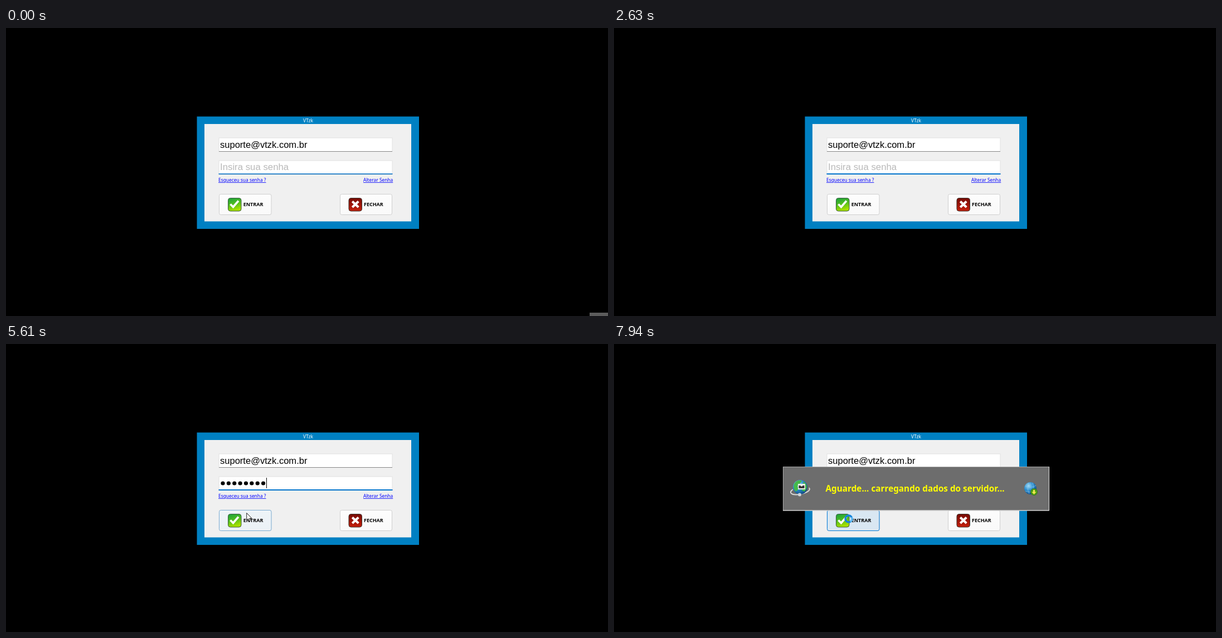
An HTML page that plays this animation: 1080 px wide and 519 px high, repeating every 8000 ms.

```html
<!DOCTYPE html>
<html lang="pt-BR">
<head>
<meta charset="utf-8">
<title>Login</title>
<style>
html, body { margin: 0; width: 100%; height: 100%; overflow: hidden; background: #000; }
svg { display: block; width: 100%; height: 100%; font: 8.4px "Noto Sans", sans-serif; }
.input { font: 16.55px "Liberation Sans", Arial, sans-serif; }
.link { fill: #00f; text-decoration: underline; }
.bold { font-weight: bold; font-size: 9px; }
.key { fill: url(#face); stroke: #cfcfcf; }
.box { fill: #fff; stroke: #e2e2e2; }
</style>
</head>
<body>
<svg viewBox="0 0 1080 519">
  <defs>
    <linearGradient id="face" x2="0" y2="1"><stop stop-color="#fdfdfd"/><stop offset="1" stop-color="#f9f9f9"/></linearGradient>
    <linearGradient id="green" x2=".3" y2="1"><stop stop-color="#18a03c"/><stop offset=".5" stop-color="#4dbb22"/><stop offset="1" stop-color="#a6e000"/></linearGradient>
    <linearGradient id="red" x2="0" y2="1"><stop stop-color="#750b04"/><stop offset="1" stop-color="#c51f0c"/></linearGradient>
    <radialGradient id="globe" cx=".35" cy=".3" r=".75"><stop stop-color="#a4dcf6"/><stop offset=".5" stop-color="#2f8fcf"/><stop offset="1" stop-color="#0d4580"/></radialGradient>
  </defs>
  <rect width="1080" height="519"/>
  <rect id="corner" x="1047" y="513" width="33" height="6" fill="#5c5c5c"/>

  <rect x="342.5" y="159.5" width="398.5" height="202.5" fill="#0080c2"/>
  <rect x="356" y="173" width="371" height="175.5" fill="#f0f0f0"/>
  <text x="542" y="170" text-anchor="middle" fill="#fff">VTzk</text>

  <rect class="box" x="382" y="198" width="311" height="24.5"/>
  <rect x="382" y="222" width="311" height="1" fill="#868686"/>
  <text class="input" x="384" y="215.5">suporte@vtzk.com.br</text>

  <rect class="box" x="382" y="239" width="311" height="24.5"/>
  <rect x="382" y="263" width="311" height="1" fill="#868686"/>
  <rect id="focus" x="381.5" y="262" width="312" height="2" fill="#0073cc"/>
  <text id="hint" class="input" x="384" y="256" style="font-size:16.8px" fill="#b9b9b9">Insira sua senha</text>
  <g id="dots"></g>
  <rect id="caret" y="241" width="1" height="19"/>

  <text class="link" x="381" y="277">Esqueceu sua senha ?</text>
  <text class="link" x="641" y="277">Alterar Senha</text>

  <rect class="key" x="382.5" y="299.5" width="93.5" height="37" rx="3"/>
  <rect id="hover" x="382.5" y="299.5" width="93.5" height="37" rx="3" fill="#d9e7f2" stroke="#0078d4"/>
  <g id="pressed">
    <rect x="382" y="299" width="94.5" height="38" fill="#f1f1f1"/>
    <rect x="384.5" y="301.5" width="90" height="33" fill="none" stroke="#222" stroke-dasharray="1"/>
  </g>
  <g id="enter">
    <rect x="398.5" y="306.5" width="23.5" height="23.5" rx="4" fill="url(#green)" stroke="#3d5a45"/>
    <path d="M402.5 317.5L407.5 322.5L417 311.5" fill="none" stroke="#fff" stroke-width="3.6"/>
    <text class="bold" x="425.7" y="321">ENTRAR</text>
  </g>

  <rect class="key" x="599.5" y="299.5" width="93" height="37" rx="3"/>
  <rect x="615" y="306.5" width="23.5" height="23.5" rx="4" fill="url(#red)" stroke="#3c3430"/>
  <path d="M621.3 312.5L632.3 323M632.3 312.5L621.3 323" stroke="#fff" stroke-width="4.2"/>
  <text class="bold" x="642" y="321">FECHAR</text>

  <g id="splash">
    <rect x="303.5" y="221.5" width="477" height="78.5" fill="#6d6d6d" stroke="#a8a8a8"/>
    <path d="M303 300H780.5V221" fill="none" stroke="#e6e6e6"/>
    <text x="379.5" y="266" fill="#ff0" style="font-weight:bold;font-size:15.3px">Aguarde... carregando dados do servidor...</text>

    <path d="M321 262C312 268 319 273 331 271C345 269 354 264 350 259" fill="none" stroke="#d9d9d9" stroke-width="2"/>
    <circle cx="334" cy="258" r="13" fill="url(#globe)"/>
    <path d="M323 253C326 246 333 244 337 247L333 252L329 256L331 262L326 266Q321 260 323 253ZM340 248Q346 252 346 259L342 266L337 264Z" fill="#45b94b"/>
    <rect x="330" y="252" width="13" height="10" fill="#e9efe9"/>
    <path d="M331.5 260V255H334L336.5 257L339 255H341.5V260Z" fill="#333"/>
    <circle cx="333" cy="271.5" r="3" fill="#cfd3d6"/>

    <circle cx="747" cy="260" r="11" fill="url(#globe)"/>
    <path d="M738 256Q747 261 757 255M738 265Q747 269 756 264M744 250Q740 260 745 270M751 250Q755 260 750 270" fill="none" stroke="#8cc9ec" opacity=".65"/>
    <circle cx="753.5" cy="266.5" r="6" fill="#4f9d17" stroke="#2d6b0d" stroke-width=".7"/>
    <path d="M752 263H755V266.5H757.5L753.5 271L749.5 266.5H752Z" fill="#f1e94d"/>
  </g>

  <path id="arrow" d="M0 0V13L3 10.3L5 14.8L7 14L5 9.6H9.2Z" fill="#fff" stroke="#000" stroke-width=".9"/>
  <path id="beam" d="M-3-6H-.8M.8-6H3M0-5.7V5.7M-3 6H-.8M.8 6H3" stroke="#000" stroke-width="1.1"/>
  <g id="busy" fill="none" stroke-width="3.4">
    <circle cx="421" cy="315" r="6" stroke="#1583d8"/>
    <path id="glow" d="M421 309A6 6 0 0 1 427 315" stroke="#69c0f5"/>
  </g>
</svg>
<script>
const $ = id => document.getElementById(id);
const LOOP = 8000, STEP = 68, PITCH = 10.37;
const keyTimes = [2770, 2910, 3530, 3600, 3860, 3930, 4330, 4460];
const caretSpans = [[2100, 2630], [2770, 4990], [5520, 6090]];

$('dots').innerHTML = keyTimes.map((_, i) =>
  `<circle cx="${389 + PITCH * i}" cy="251" r="3.6"/>`).join('');

const show = (id, on) => $(id).setAttribute('visibility', on ? 'visible' : 'hidden');
const clamp = v => Math.max(0, Math.min(1, v));
const mix = (a, b, p) => a + (b - a) * p;
// Progress in n screen updates, the first one at the start time
const ramp = (t, start, n) => clamp((Math.floor((t - start) / STEP) + 1) / n);

function pointer(t) {
  if (t >= 800 && t < 870) return { kind: 'arrow', x: 580, y: 308 };
  if (t >= 870 && t < 2630) {
    const p = ramp(t, 1410, 7);
    return { kind: 'beam', x: mix(550.5, 484.5, p) - 4 * ramp(t, 1890, 3), y: mix(260.5, 255, p) };
  }
  if (t >= 5180 && t < 6770) {
    const p = ramp(t, 5180, 12), e = p * (2 - p), y = mix(255, 315, e);
    return { kind: y < 264 ? 'beam' : 'arrow', x: mix(480.5, 421.5, e), y };
  }
  return {};
}

function focusLevel(t) {
  if (t < 2090) return 0.75 * (1 - ramp(t, 70, 6));
  if (t < 2630) return 0.75 * ramp(t, 2090, 2);
  return t < 6160 ? 1 : 0.75;
}

function draw(t) {
  const typed = keyTimes.filter(k => t >= k).length;
  const loading = t >= 6770, down = t >= 6160 && !loading;
  const at = pointer(t);

  show('corner', t < 70);
  show('hint', !typed);
  [...$('dots').children].forEach((dot, i) => dot.setAttribute('visibility', i < typed ? 'visible' : 'hidden'));
  show('caret', caretSpans.some(([a, b]) => t >= a && t < b));
  $('caret').setAttribute('x', 384 + PITCH * typed);
  $('focus').setAttribute('opacity', focusLevel(t));

  $('hover').setAttribute('opacity', loading ? 1 : t < 5180 ? 0 : clamp((at.y - 299) / 14));
  show('pressed', down);
  $('enter').setAttribute('transform', down ? 'translate(1 1)' : '');

  for (const kind of ['arrow', 'beam']) {
    show(kind, at.kind === kind);
    if (at.kind === kind) $(kind).setAttribute('transform', `translate(${at.x} ${at.y})`);
  }
  show('splash', loading);
  show('busy', loading);
  $('glow').setAttribute('transform', `rotate(${(t - 6770) * 0.36} 421 315)`);
}

let start;
function tick(now) {
  start ??= now;
  draw((now - start) % LOOP);
  requestAnimationFrame(tick);
}
draw(0);
requestAnimationFrame(tick);
</script>
</body>
</html>
```
